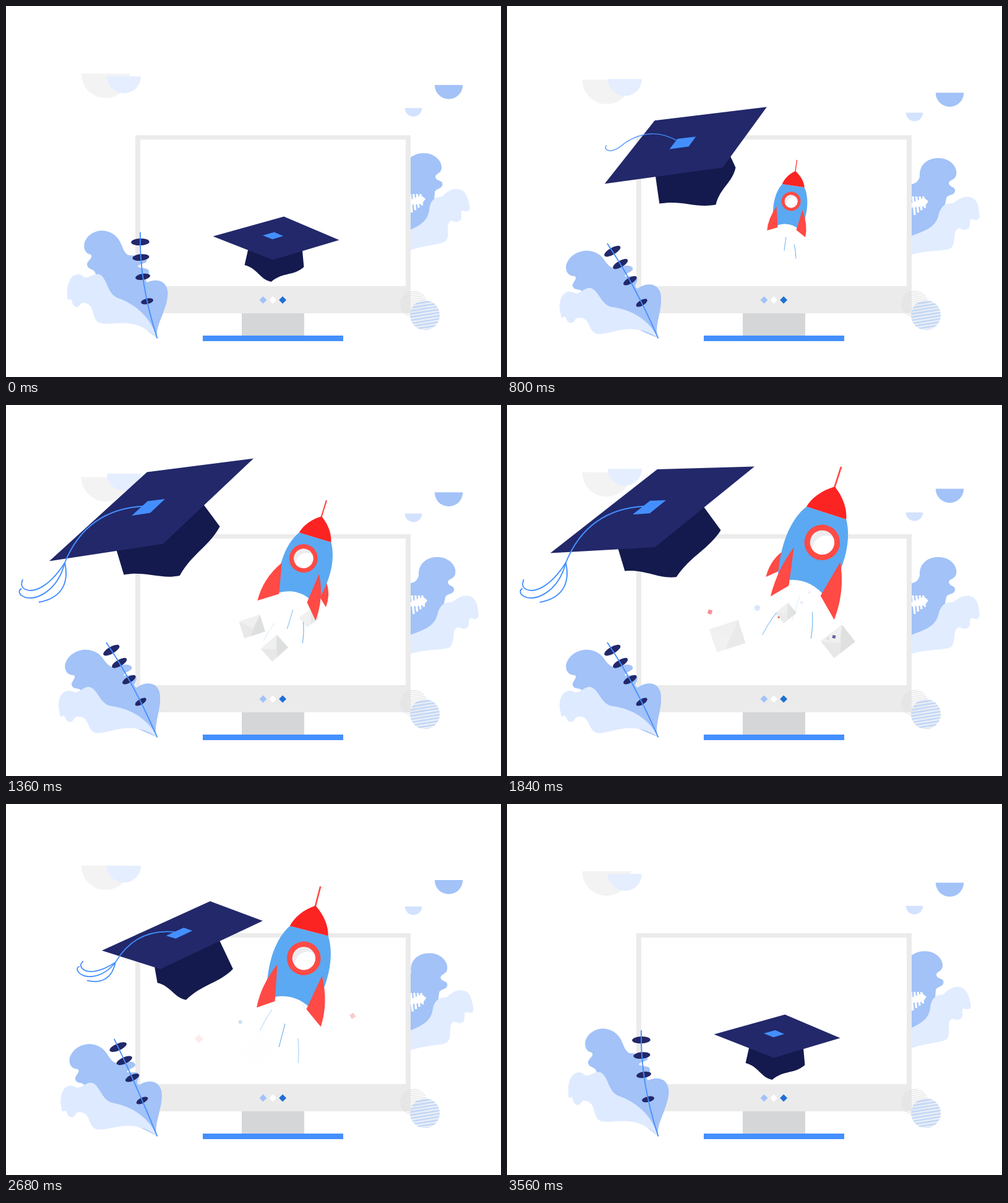
Animation of 800 by 600 pixels, one loop 3.6 s. Source, as an HTML page with a canvas:

```html
<!DOCTYPE html>
<html lang="en">
<head>
<meta charset="utf-8">
<title>Graduation launch</title>
<style>
  html, body { margin: 0; width: 100%; height: 100%; overflow: hidden; background: #fff; }
  canvas { display: block; }
</style>
</head>
<body>
<canvas id="stage" width="800" height="600"></canvas>
<script>
const ctx = document.getElementById('stage').getContext('2d');
const LOOP = 3600, TAU = 2 * Math.PI;
const BLUE = '#448fff', NAVY = '#22286a', DEEP = '#141a4d', LEAF = '#a2c2f8', RED = '#ff4a45';

const mix = (a, b, f) => a + (b - a) * f;
const rad = deg => deg * TAU / 360;
const clamp = f => Math.max(0, Math.min(1, f));
function ease(from, to, t) {
  const f = clamp((t - from) / (to - from));
  return f * f * (3 - 2 * f);
}

// Smooth monotone motion through key poses, each written as [time, ...values].
function poseAt(t, poses) {
  const last = poses.length - 1;
  let i = 0;
  while (i < last - 1 && t >= poses[i + 1][0]) i++;
  const span = poses[i + 1][0] - poses[i][0];
  const f = clamp((t - poses[i][0]) / span), g = 1 - f;
  return poses[0].slice(1).map((_, k) => {
    const v = j => poses[j][k + 1];
    const rise = j => (v(j + 1) - v(j)) / (poses[j + 1][0] - poses[j][0]);
    const slope = j => {
      if (j === 0 || j === last) return 0;
      const a = rise(j - 1), b = rise(j);
      return a * b <= 0 ? 0 : 2 * a * b / (a + b);
    };
    return mix(v(i), v(i + 1), f * f * (3 - 2 * f)) + span * f * g * (g * slope(i) - f * slope(i + 1));
  });
}

function fill(path, color) {
  ctx.fillStyle = color;
  ctx.fill(new Path2D(path));
}
function line(path, color, width) {
  ctx.strokeStyle = color;
  ctx.lineWidth = width;
  ctx.stroke(new Path2D(path));
}
function rect(x, y, w, h, color) {
  ctx.fillStyle = color;
  ctx.fillRect(x, y, w, h);
}
function disc(x, y, rx, color, ry = rx, turn = 0, end = TAU) {
  ctx.fillStyle = color;
  ctx.beginPath();
  ctx.ellipse(x, y, rx, ry, turn, 0, end);
  ctx.fill();
}
function placed(x, y, deg, scale, draw) {
  ctx.save();
  ctx.translate(x, y);
  ctx.rotate(rad(deg));
  ctx.scale(scale, scale);
  draw();
  ctx.restore();
}
function clipDisc(x, y, r) {
  ctx.beginPath();
  ctx.arc(x, y, r, 0, TAU);
  ctx.clip();
}
function hatch(x, y, r, color, gap, width, deg) {
  placed(x, y, deg, 1, () => {
    clipDisc(0, 0, r);
    for (let k = -r + gap / 2; k < r; k += gap) rect(-r, k, 2 * r, width, color);
  });
}
// Leans a shape about its root; a, b, c, d are the matrix changes at full lean.
function leaning(x, y, amount, [a, b, c, d], path, color) {
  ctx.save();
  ctx.translate(x, y);
  ctx.transform(1 + a * amount, b * amount, c * amount, 1 + d * amount, 0, 0);
  ctx.translate(-x, -y);
  fill(path, color);
  ctx.restore();
}

function cloud(t, x, r, color, middle, swing, peak) {
  const top = middle + swing * Math.cos(TAU * (t - peak) / LOOP);
  disc(x, top, r, color, r, 0, Math.PI);
}
function clouds(t) {
  cloud(t, 161, 39.5, '#f3f3f3', 109.5, 10, 900);
  cloud(t, 190.5, 27.5, '#e5eeff', 108.7, 10, 600);
  cloud(t, 715.5, 22.7, LEAF, 132, 10, 1150);
  cloud(t, 658.5, 13.8, '#d2e2ff', 169.5, 6, 1400);
}

function rightPlant(t) {
  const lean = ease(0, 800, t) * (1 - ease(2280, 3000, t));
  const bend = [0, .09, -.13, 0];
  leaning(585, 432, lean, bend, 'M630 284C640 284 645 279 646 270C642 250 657 238 675 238C694 238 705 252 704 262C703 272 694 270 694 277C696 284 705 281 705.5 288C705 297 695 294 693 301L690 340L630 400Z', LEAF);
  leaning(585, 432, lean, bend, 'M630 373C668 356 681 350 684 330C686 310 697 309 705 308C714 300 722 293 735 297C746 302 748 318 750 326C748 336 742 330 737 331C733 335 740 345 732 348C724 352 722 343 716 350C711 358 718 370 711 380C702 388 670 384 630 405Z', '#e1ecff');
  placed(3 * lean, 4 * lean, 0, 1, () => {
    fill('M671 306L678 312L672 320L650 322L650 315Z', '#fff');
    for (let x = 653; x < 670; x += 5.5) line(`M${x} 304L${x + 3} ${334 - (x - 653) * .7}`, '#fff', 3.4);
  });
}

function monitor() {
  rect(209, 209, 445, 288, '#ebebeb');
  rect(217, 216, 429, 237, '#fff');
  rect(381, 497, 101, 36, '#d5d6d8');
  rect(318, 533, 227, 9, BLUE);
  [LEAF, '#fff', '#1f6fd6'].forEach((color, k) =>
    placed(415.5 + 15.8 * k, 475.5, 45, 1, () => rect(-4.2, -4.2, 8.4, 8.4, color)));
  hatch(659, 482, 22, '#dcdcdc', 3, 1, -8);
  disc(677, 500, 24, 'rgba(222,230,242,.7)');
  hatch(677, 500, 24, '#bcd4f8', 5, 2, -9);
}

// Apex x, y, scale and tilt of the rocket.
const ROCKET = [
  [0, 437, 390, 0, 0], [800, 466, 267, .49, 8], [1360, 510, 180, .73, 17],
  [2280, 538, 111, 1, 18], [3000, 462, 240, .65, 9.5], [3500, 437, 390, 0, 0]
];
const fin = (root, tip, tipY, inner) =>
  fill(`M${root} 124Q${tip + Math.sign(tip) * 3} 170 ${tip} ${tipY}L${inner} 192Z`, RED);

function rocket(t) {
  const [x, y, scale, tilt] = poseAt(t, ROCKET);
  if (scale < .01) return;
  const spin = -Math.cos(TAU * (t - 1360) / 920) * ease(800, 1360, t) * (1 - ease(2280, 3000, t));
  const turn = Math.abs(spin);
  placed(x, y, tilt, scale, () => {
    for (let k = -1; k <= 1; k++) {
      const phase = (t / 600 + k / 3 + 1) % 1, from = 200 + 60 * phase;
      ctx.globalAlpha = Math.sin(Math.PI * phase);
      line(`M${k * 30} ${from}Q${k * 38} ${from + 20} ${k * 42} ${from + 45}`, '#62aaf0', 1.1 / scale);
    }
    ctx.globalAlpha = 1;
    fill(`M${-54 * spin} 138Q${-70 * spin} 160 ${-68 * spin} ${150 + 40 * turn}L${-46 * spin} 170Z`, RED);
    line('M0 2L0 -37', RED, 3);
    fill('M-37 49C-56 78 -63 125 -45 192Q0 162 45 192C63 125 55 78 37 49Z', '#5ba9f2');
    fill('M0 0C21 14 33 32 37 49L-37 49C-33 32 -21 14 0 0Z', '#fc2323');
    const eye = 10 * spin - turn, left = -65 + 16 * spin, right = 63 + 8 * spin, low = 207 + 13 * turn;
    disc(eye, 101, 31.5, RED);
    ctx.save();
    clipDisc(eye, 101, 21.5);
    rect(eye - 22, 79, 44, 44, '#ececee');
    disc(eye + 11, 111, 25, '#fff');
    ctx.restore();
    fin(-45 + 9 * spin, left, low, left * .49);
    fin(41 + 9 * spin, right, low + 5, 30 + 5 * spin);
  });
}

function envelope() {
  rect(-.5, -.4, 1, .8, '#e8e8e8');
  fill('M-.5 -.4L.5 -.4L0 .08Z', '#f0f0f0');
  fill('M.5 -.4L.5 .4L-.2 .4Z', 'rgba(208,210,210,.4)');
}
// Throws a piece out of the exhaust: quick at first, slowing down, then fading.
function toss(t, birth, life, x, y, size, deg, draw) {
  const f = (t - birth) / life;
  if (f <= 0 || f >= 1) return;
  const [ax, ay, scale, tilt] = poseAt(birth, ROCKET), drop = 190 * scale;
  const out = 1 - (1 - f) ** 3;
  ctx.globalAlpha = Math.min(1, f * 6, (1 - f) * 2);
  placed(mix(ax - drop * Math.sin(rad(tilt)), x, out), mix(ay + drop * Math.cos(rad(tilt)), y, out),
    deg, size * (.3 + .7 * out), draw);
  ctx.globalAlpha = 1;
}
function seeded(seed) {
  return () => (seed = seed * 16807 % 2147483647) / 2147483647;
}
function debris(t) {
  toss(t, 1080, 1100, 353, 375, 50, -18, envelope);
  toss(t, 1140, 600, 424, 415, 42, -42, envelope);
  toss(t, 1200, 1500, 551, 396, 50, -38, envelope);
  toss(t, 1700, 1000, 408, 398, 48, -40, envelope);
  toss(t, 1950, 700, 384, 460, 64, -38, envelope);
  const random = seeded(2024);
  const colors = ['#f0858a', LEAF, '#5d64a0', '#e0e0e0', '#ee6a6a', '#d3e3ff'];
  for (let k = 0; k < 14; k++) {
    const x = 310 + 260 * random(), y = 315 + 95 * random();
    const size = 4 + 9 * random(), deg = 60 * random(), color = colors[k % 6];
    toss(t, 1420 + 55 * k, 760, x, y, size, deg, () =>
      k % 5 === 1 ? hatch(0, 0, .9, '#b4d1fb', .36, .18, 0) : rect(-.5, -.5, 1, 1, color));
  }
}

// Cap pose: board centre, its two half diagonals, crown drop, then tassel knot, size and turn.
const RESTING = [436.5, 375.5, 102, 3, -9, 35, -3, 45, 435, 369, 0, 20];
const RISING = [289, 225.5, 131, -62, 55, 38, 19, 65, 190, 222, .4, 15];
const ALOFT = [235, 169.5, 165, -83, 13, 58, 33, 66, 95, 255, 1, 0];
const FALLING = [347, 271, 104, 18, -78, 50, 8, 63, 280, 258, .38, 41];
const CAP = [
  [0, ...RESTING], [800, ...RISING], [1360, ...ALOFT], [2280, ...ALOFT], [3000, ...FALLING], [3560, ...RESTING]
];

// Slightly S-shaped edge from a to b.
function wave(a, b) {
  const dx = b[0] - a[0], dy = b[1] - a[1], n = 7 / Math.hypot(dx, dy);
  return `C${a[0] + dx * .4 + dy * n} ${a[1] + dy * .4 - dx * n} ${a[0] + dx * .65 - dy * n} ${a[1] + dy * .65 + dx * n} ${b}`;
}

function cap(t) {
  let [cx, cy, ex, ey, fx, fy, wx, wy, kx, ky, size, turn] = poseAt(t, CAP);
  const sway = Math.sin(Math.PI * clamp((t - 1360) / 920)) ** 2;
  ey += 13 * sway;
  fx -= 15 * sway;
  fy += 5 * sway;

  const at = (e, f, drop = 0) => [cx + ex * e + fx * f + wx * drop, cy + ey * e + fy * f + wy * drop];
  const left = at(-.47, 0, 1), low = at(0, .47, 1.2), right = at(.47, 0, 1);
  fill(`M${at(-.4, 0)}L${left}${wave(left, low)}${wave(low, right)}L${at(.4, 0)}Z`, DEEP);
  const board = [at(-1, 0), at(.036, -1), at(1, 0), at(.036, 1)];
  fill(`M${board.join('L')}Z`, NAVY);
  const bx = cx - 5, by = cy - 4;
  const button = board.map(([x, y]) => [bx + (x - cx) * .163, by + (y - cy) * .163]);
  fill(`M${button.join('L')}Z`, BLUE);

  if (size < .02) return;
  const x = bx - 6, y = by - 2, dx = kx - x, dy = ky - y;
  const width = .6 + 1.3 * Math.min(1, size * 1.2);
  line(`M${x} ${y}Q${x + dx / 2 - dy * .32} ${y + dy / 2 + dx * .32} ${kx} ${ky}`, BLUE, width);
  placed(kx, ky, turn, size, () => {
    line('M0 0C-24 38 -50 50 -64 43C-72 39 -70 33 -68 27', BLUE, width / size);
    ctx.globalAlpha = ease(800, 1360, t);
    line('M0 0C-12 48 -52 66 -70 53C-76 48 -73 43 -70 42', BLUE, width / size);
    line('M0 0C8 36 -8 58 -42 64', BLUE, width / size);
    ctx.globalAlpha = 1;
  });
}

function leftPlant(t) {
  const lean = ease(0, 800, t) * (1 - ease(2280, 3560, t));
  leaning(244, 537, lean, [.022, -.236, .188, -.071], 'M244 537C241 515 262 490 261.5 463C259 440 238 442 228 447C222 440 232 436 231 429C230 423 222 425 213 422C212 416 230 418 227 410C222 400 204 406 196 402C188 396 188 384 180 375C165 357 136 360 127 382C124 394 130 401 137 402C142 407 131 412 131 418C132 428 143 423 145 434C150 470 200 500 244 537Z', LEAF);
  leaning(244, 537, lean, [.02, -.18, .14, -.05], 'M244 537C235 505 210 482 180 472C163 465 164 440 151 434C140 431 132 445 123 436C108 428 98 446 99 465C100 472 98 476 102 475C108 470 105 484 112 486C118 490 120 478 126 480C145 482 137 505 150 512C170 520 206 498 244 537Z', '#deeaff');

  const top = [mix(217, 162, lean), mix(366, 384, lean)];
  const bend = [mix(215, 206, lean), mix(448, 449, lean)], root = [244.5, 537.5];
  for (const s of [.095, .245, .43, .66]) {
    const [x, y] = [0, 1].map(k => mix(mix(top[k], bend[k], s), mix(bend[k], root[k], s), s));
    disc(x, y, 15.5 - 8 * s, NAVY, 5.8 - 2 * s, rad(-20 * s - (30 - 20 * s) * lean));
  }
  line(`M${top}Q${bend} ${root}`, BLUE, 1.8);
}

const start = performance.now();
function frame() {
  const t = (performance.now() - start) % LOOP;
  rect(0, 0, 800, 600, '#fff');
  clouds(t);
  rightPlant(t);
  monitor();
  debris(t);
  rocket(t);
  cap(t);
  leftPlant(t);
  requestAnimationFrame(frame);
}
frame();
</script>
</body>
</html>
```
